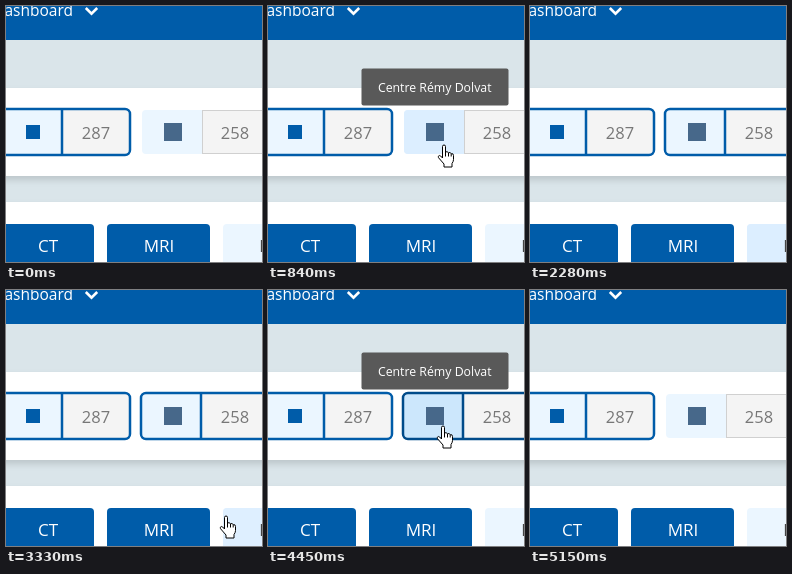
An HTML page for the animation above (5700 ms loop, 256 by 256 pixels).

```html
<!DOCTYPE html>
<html lang="en">
<head>
<meta charset="utf-8">
<title>Centre picker</title>
<style>
  html, body { margin: 0; height: 100%; overflow: hidden; }
  svg { display: block; width: 100vw; height: 100vh; font-family: "Open Sans", "Noto Sans", sans-serif; font-size: 16.5px; }
  .blue { fill: #005ca9; }
  .pale { fill: #ebf6ff; }
  .hover { fill: #dceeff; }
  .press { fill: #cce7fc; }
  .field { fill: #f4f4f4; }
  .count { fill: #777; }
  .ring { fill: none; stroke: #005ca9; stroke-width: 2.5; }
  .card { fill: #fff; filter: drop-shadow(0 4px 3px #0002); }
  .label { fill: #fff; text-anchor: middle; }
  .cursor { fill: #fff; stroke: #000; stroke-linejoin: round; }
</style>
</head>
<body>
<svg viewBox="0 0 256 256">
  <defs>
    <path id="half" d="M196 104H140a4 4 0 0 0-4 4V144a4 4 0 0 0 4 4H196z"/>
  </defs>
  <rect width="256" height="256" fill="#dae5ea"/>
  <rect class="blue" width="256" height="34"/>
  <text x="67" y="10" fill="#fff" font-size="15.5" text-anchor="end">Dashboard</text>
  <path d="M79.8 2l5.7 5.7L91.2 2" fill="none" stroke="#fff" stroke-width="2.6"/>
  <rect class="card" x="-20" y="82" width="300" height="88"/>
  <rect class="card" x="-20" y="196" width="300" height="90"/>

  <!-- first centre, always selected -->
  <rect class="pale" x="-10" y="103" width="66" height="46"/>
  <rect class="field" x="56" y="103" width="68" height="46" rx="4"/>
  <rect class="blue" x="20" y="119" width="14" height="14"/>
  <path class="ring" d="M-10 103H119a5 5 0 0 1 5 5V144a5 5 0 0 1-5 5H-10M56 103V149"/>
  <text class="count" x="90" y="133" text-anchor="middle">287</text>

  <!-- second centre -->
  <use class="pale" href="#half"/>
  <use class="hover" id="hover" href="#half"/>
  <use class="press" id="press" href="#half"/>
  <rect class="field" x="196" y="104" width="80" height="44"/>
  <rect id="edge" x="196.5" y="104.5" width="80" height="43" fill="none" stroke="#d0d0d0"/>
  <rect x="158" y="117" width="18" height="18" fill="#47688a"/>
  <path class="ring" id="ring" d="M270 103H140a5 5 0 0 0-5 5V144a5 5 0 0 0 5 5H270M195 103V149"/>
  <text class="count" x="229" y="133" text-anchor="middle">258</text>

  <!-- modality buttons -->
  <rect class="blue" x="-4" y="218" width="92" height="60" rx="4"/>
  <rect class="blue" x="101" y="218" width="103" height="60" rx="4"/>
  <rect class="pale" x="217" y="218" width="103" height="60" rx="4"/>
  <rect class="hover" id="button" x="217" y="218" width="103" height="60" rx="4"/>
  <text class="label" x="42" y="246" font-size="17">CT</text>
  <text class="label" x="153" y="246" font-size="17">MRI</text>
  <text x="253.3" y="246" fill="#444">PET</text>

  <g id="tip">
    <rect x="93.5" y="62.5" width="147" height="37" rx="2" fill="#595959"/>
    <text class="label" x="166.7" y="86" font-size="12.3">Centre Rémy Dolvat</text>
  </g>

  <g id="cursor" class="cursor">
    <path id="hand" d="M5 13.5V2a1.5 1.5 0 0 1 3 0V7.5q1.6-1 3 .7q1.6-.7 2.7.9q2.3-.5 2.3 2V15q0 2-1.5 4V22.5H6.5V19.5L1 13.2q-.9-1.6.8-2.2q1.2-.2 3.2 2.5zM8 7.5V12M11 8.5V12M13.7 9.5V12"/>
    <path id="arrow" d="M6 0V16.5L9.8 13L12.3 18.8L14.6 17.8L12.2 12.2H17.5z"/>
  </g>
</svg>
<script>
const LOOP = 5700, STEP = 70;
const starts = [0, 210, 1660, 1930, 3330, 4450, 4800];
const easeIn = p => p * p;
const easeOut = n => p => 1 - (1 - p) ** n;

// start, end, from, to, easing
const moves = [
  [210, 840, [227, 240], [170, 139], easeOut(3)],
  [1870, 2280, [170, 139], [242, 319], easeIn],
  [3330, 3960, [214, 226], [169, 136], easeOut(2)],
  [4740, 5150, [169, 136], [224, 316], easeIn]
];

const el = id => document.getElementById(id);
const fade = (id, value) => el(id).setAttribute("opacity", value);
const ramp = (t, a, b) => Math.min(1, Math.max(0, (t - a) / (b - a)));
const pulse = (t, a, b, c, d) => ramp(t, a, b) - ramp(t, c, d);

function drawCursor(t) {
  const move = moves.findLast(m => t >= m[0]);
  fade("cursor", move ? 1 : 0);
  if (!move) return;
  const [start, end, from, to, ease] = move;
  const k = ease(ramp(t, start, end));
  const [x, y] = from.map((v, i) => v + (to[i] - v) * k);
  const hot = x + 6;
  const onCentre = hot > 134 && hot < 196 && y > 102 && y < 150;
  const onButton = y >= 218 && (hot < 204 || hot >= 217);
  const link = onCentre || onButton;
  fade("hand", link ? 1 : 0);
  fade("arrow", link ? 0 : 1);
  el("cursor").setAttribute("transform", `translate(${x - 0.5} ${y - 0.5})`);
}

function draw(now) {
  const time = now % LOOP;
  const start = starts.findLast(s => time >= s);
  const t = start + Math.floor((time - start) / STEP) * STEP;
  const over = pulse(t, 560, 770, 1930, 2140) + pulse(t, 3750, 3890, 4800, 5010);
  const selected = pulse(t, 1590, 1730, 4450, 4590);
  fade("tip", over);
  fade("hover", over);
  fade("press", pulse(t, 1590, 1660, 1660, 1730) + pulse(t, 4380, 4450, 4450, 4590));
  fade("ring", selected);
  el("ring").style.stroke = `color-mix(in srgb, #004b8a ${over * 100}%, #005ca9)`;
  fade("edge", 1 - selected);
  fade("button", pulse(t, 2140, 2280, 3300, 3500));
  drawCursor(t);
}

const origin = performance.now();
function tick() {
  draw(performance.now() - origin);
  requestAnimationFrame(tick);
}
tick();
</script>
</body>
</html>
```
